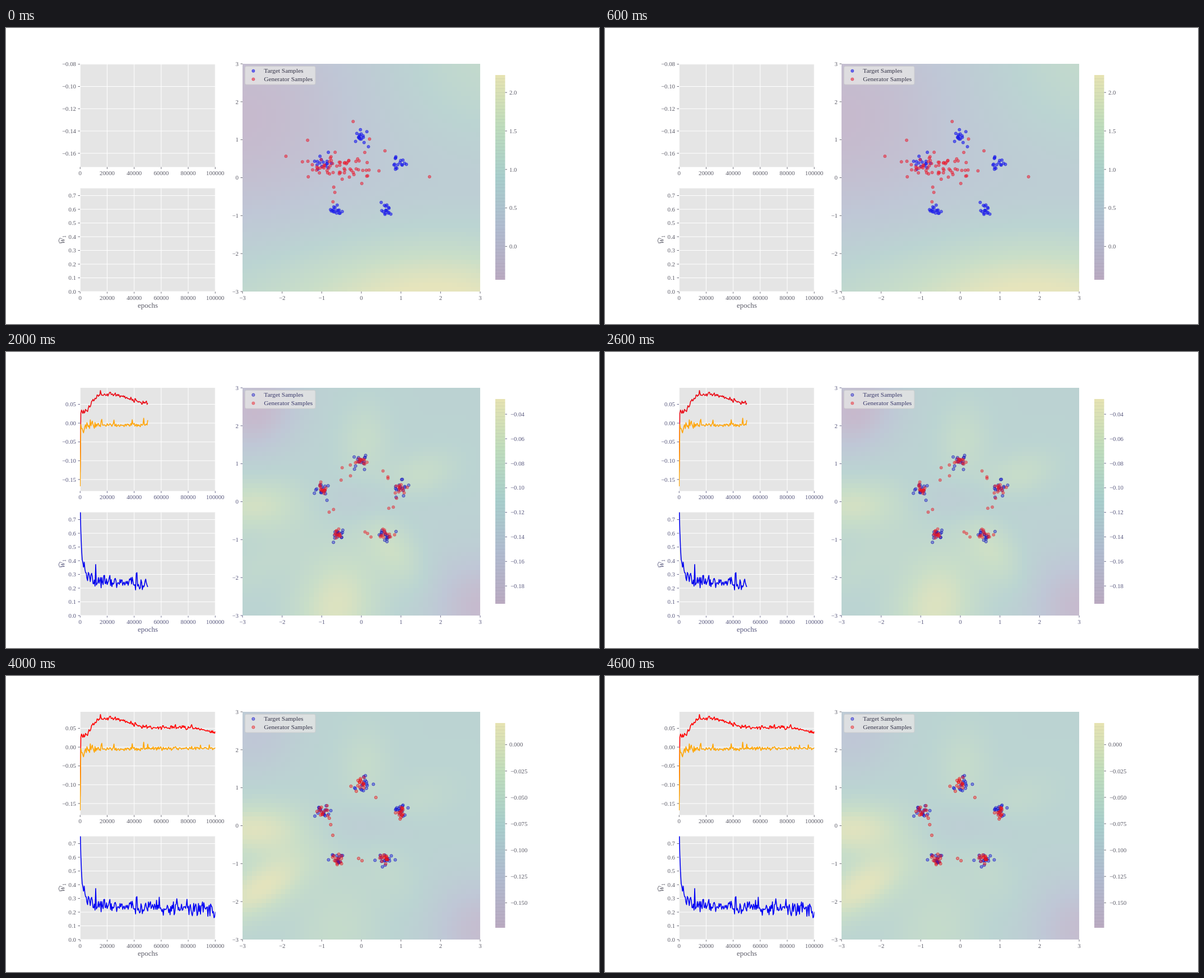
Recreate the animation shown at these times as an HTML page with a canvas. Size 1058 by 529 pixels, loop 5000 ms.

```html
<!DOCTYPE html>
<html lang="en">
<head>
<meta charset="utf-8">
<title>Training progress</title>
<style>
html, body { margin: 0; width: 100%; height: 100%; overflow: hidden; background: #fff; }
section { position: absolute; left: 0; top: 0; width: 1058px; height: 529px; visibility: hidden; animation: show 5s step-end infinite; }
canvas, svg { position: absolute; left: 0; top: 0; }
text { font-family: "Liberation Serif", "Noto Serif", serif; font-size: 10.8px; }
@keyframes show { 0% { visibility: visible; } 20%, 100% { visibility: hidden; } }
</style>
</head>
<body>
<script>
const W = 1058, H = 529, SVG = 'http://www.w3.org/2000/svg';
const PLOT = { x: 422, y: 64, w: 424, h: 407 };
const FIELD_COLORS = ['#c7b8cc', '#bfc7d6', '#bbd4d2', '#c9dec8', '#e6e4bc'];
const BAR_COLORS = ['#baaac1', '#b0bbcf', '#a8cecc', '#bedcbc', '#e6e3b2'];

// The five target clusters form a regular pentagon.
const MODES = Array.from({ length: 5 }, (_, k) => {
  const a = (90 + 72 * k) * Math.PI / 180;
  return [634 + 73 * Math.cos(a), 266 - 74 * Math.sin(a)];
});

// Hills of the critic seen from the origin: direction in degrees, distance, length, width
const HILLS = {
  top: [87, 1.6, .7, .45],
  right: [25, 1.6, .7, .42],
  lowerRight: [-57, 1.5, .8, .42],
  bottom: [257, 2.8, 1.1, .75],
  left: [182, 2.7, 1, .5],
  lowerLeft: [213, 3, 1, .45],
  topCorner: [138, 3.6, .7, .8],
  bottomCorner: [-42, 4.2, 1, .9],
  center: [0, 0, .9, .4]
};

const STEPS = [
  {
    ink: '#5c5c68', legendInk: '#333346', field: untrained,
    bar: { first: 2, delta: -.5, count: 5, digits: 1, y: 115.2, gap: 68.8 },
    target: ['rgba(25,25,240,.6)', 'rgba(25,25,220,.55)'], generator: ['rgba(240,30,50,.55)', 'rgba(215,30,50,.5)'],
    cloud: 72, perMode: 0, strays: 0
  },
  {
    ink: '#58588a', legendInk: '#3c3c78',
    field: trained(.5, { top: .24, right: .28, lowerRight: .28, bottom: .42, left: .25, lowerLeft: -.1, topCorner: -.5, bottomCorner: -.42, center: -.14 }),
    bar: { first: -.05, delta: -.025, count: 8, digits: 3, y: 106, gap: 47.2 },
    target: ['rgba(20,20,170,.36)', 'rgba(10,10,130,.6)'], generator: ['rgba(230,30,40,.42)', 'rgba(185,20,40,.6)'],
    lines: ['#e01430', '#d2a266', '#1414e0'], perMode: 10, strays: 26
  },
  {
    ink: '#58587e', legendInk: '#38386a',
    field: trained(.47, { top: .22, right: .24, lowerRight: .28, bottom: .44, left: .36, lowerLeft: .12, topCorner: -.46, bottomCorner: -.44, center: -.17 }),
    bar: { first: -.04, delta: -.02, count: 8, digits: 2, y: 111.2, gap: 43.85 },
    target: ['rgba(20,20,220,.4)', 'rgba(15,15,160,.6)'], generator: ['rgba(240,20,30,.46)', 'rgba(225,30,40,.4)'],
    lines: ['#ea0814', '#ffa50a', '#0000ee'], perMode: 13, strays: 17
  },
  {
    ink: '#565684', legendInk: '#1c1c48',
    field: trained(.48, { top: .2, right: .24, lowerRight: .2, bottom: .4, left: .36, lowerLeft: .38, topCorner: -.46, bottomCorner: -.42, center: -.21 }),
    bar: { first: -.02, delta: -.02, count: 8, digits: 2, y: 86.5, gap: 46.3 },
    target: ['rgba(20,20,190,.34)', 'rgba(10,10,140,.65)'], generator: ['rgba(250,10,15,.5)', 'rgba(230,20,30,.45)'],
    lines: ['#ff0000', '#ffa500', '#0000f0'], perMode: 12, strays: 18
  },
  {
    ink: '#5c5c68', legendInk: '#333348',
    field: trained(.49, { top: .18, right: .12, lowerRight: .1, bottom: .18, left: .45, lowerLeft: .48, topCorner: -.24, bottomCorner: -.42, center: -.15 }),
    bar: { first: 0, delta: -.025, count: 7, digits: 3, y: 122.7, gap: 47.1 },
    target: ['rgba(20,20,230,.42)', 'rgba(10,10,180,.6)'], generator: ['rgba(255,20,20,.42)', 'rgba(215,15,25,.6)'],
    lines: ['#ff0000', '#ffa500', '#0000f5'], perMode: 14, strays: 8
  }
];

function bell(x, y, sx, sy) {
  return Math.exp(-((x / sx) ** 2 + (y / sy) ** 2) / 2);
}

function untrained(x, y) {
  return .3 - .27 * bell(x + 3, y - 1.6, 1.8, 1.8) + .33 * bell(x - 3.2, y - 3.2, 1.8, 1.8)
    + .75 * bell(x - 2, y + 3.4, 2.6, 1.3) + .2 * bell(x + 3, y + 3.4, 2.2, 1.2);
}

function trained(base, heights) {
  return (x, y) => Object.entries(heights).reduce((sum, [name, height]) => {
    const [degrees, distance, length, width] = HILLS[name], a = degrees * Math.PI / 180;
    const along = x * Math.cos(a) + y * Math.sin(a), across = y * Math.cos(a) - x * Math.sin(a);
    return sum + height * bell(along - distance, across, length, width);
  }, base);
}

function random(seed) {
  return () => {
    seed = seed + 0x6D2B79F5 | 0;
    let t = Math.imul(seed ^ seed >>> 15, 1 | seed);
    t = t + Math.imul(t ^ t >>> 7, 61 | t) ^ t;
    return ((t ^ t >>> 14) >>> 0) / 4294967296;
  };
}

function normal(rnd) {
  return Math.sqrt(-2 * Math.log(1 - rnd())) * Math.cos(2 * Math.PI * rnd());
}

function smooth(from, to, t) {
  const p = Math.max(0, Math.min(1, (t - from) / (to - from)));
  return p * p * (3 - 2 * p);
}

// Loss histories: the trend of y over training progress t, the noise and the height of rare peaks
const CURVES = [
  { start: 215, trend: t => 107 - 31 * smooth(.03, .14, t) + 16 * smooth(.25, .5, t) + 9 * smooth(.83, 1, t),
    noise: t => 3 + 7 * Math.exp(-t / .03), peak: 4, seed: 7 },
  { start: 240, trend: t => 131 - 2 * t + 12 * bell(t - .024, 0, .008, 1),
    noise: t => 3 + 9 * Math.exp(-t / .06), peak: 10, seed: 21 },
  { start: 270, trend: t => 412 + 3 * t - 45 * Math.exp(-t / .05) - 80 * Math.exp(-t / .008) + 14 * smooth(.95, 1, t),
    noise: t => 11, peak: 16, seed: 33 }
];

function history({ start, trend, noise, peak, seed }) {
  const rnd = random(seed);
  return Array.from({ length: 201 }, (_, k) => {
    const t = k / 200, jitter = (rnd() + rnd() - 1) * noise(t) * 1.4;
    const rise = rnd() < .06 ? peak * (.6 + .4 * rnd()) : 0;
    return [132.3 + 241.2 * t, k ? trend(t) + jitter - rise : start];
  });
}

const histories = CURVES.map(history);

function ramp(colors, v) {
  const p = Math.max(0, Math.min(.9999, v)) * (colors.length - 1), i = Math.floor(p);
  const channel = (color, k) => parseInt(color.slice(1 + 2 * k, 3 + 2 * k), 16);
  const mix = k => Math.round(channel(colors[i], k) + (channel(colors[i + 1], k) - channel(colors[i], k)) * (p - i));
  return `rgb(${[0, 1, 2].map(mix)})`;
}

function number(v, digits) {
  return (v < 0 ? '\u2212' : '') + Math.abs(v).toFixed(digits);
}

function drawStep(step, index) {
  const section = document.createElement('section');
  section.style.animationDelay = `${index - 5}s`;
  const canvas = document.createElement('canvas');
  canvas.width = W;
  canvas.height = H;
  const svg = document.createElementNS(SVG, 'svg');
  svg.setAttribute('width', W);
  svg.setAttribute('height', H);
  section.append(canvas, svg);
  const ctx = canvas.getContext('2d');

  function text(value, x, y, anchor, style = '', fill = step.ink) {
    const node = document.createElementNS(SVG, 'text');
    const attrs = { x, y, fill, style, 'text-anchor': anchor };
    for (const key in attrs) node.setAttribute(key, attrs[key]);
    node.textContent = value;
    svg.append(node);
    return node;
  }

  function sideText(value, x, y, style) {
    text(value, 0, 0, 'start', style).setAttribute('transform', `translate(${x} ${y}) rotate(-90)`);
  }

  function line(color, width, ...points) {
    ctx.strokeStyle = color;
    ctx.lineWidth = width;
    ctx.beginPath();
    for (const [x, y] of points) ctx.lineTo(x, y);
    ctx.stroke();
  }

  function tickX(x, y, label) {
    line(step.ink, .9, [x, y], [x, y + 3.5]);
    text(label, x, y + 14.8, 'middle');
  }

  function tickY(x, y, label) {
    line(step.ink, .9, [x - 3.5, y], [x, y]);
    text(label, x - 7, y + 3.7, 'end');
  }

  function panel(top, ticks) {
    ctx.fillStyle = '#e5e5e5';
    ctx.fillRect(132, top, 241.5, 184.5);
    for (let i = 0; i <= 5; i++) {
      const x = 132.3 + i * 48.2;
      line('#fff', 1, [x, top], [x, top + 184.5]);
      tickX(x, top + 184.5, i * 20000);
    }
    for (const [y, label] of ticks) {
      line('#fff', 1, [132, y], [373.5, y]);
      tickY(132, y, label);
    }
  }

  function curve(points, color, top) {
    ctx.save();
    ctx.beginPath();
    ctx.rect(132, top, 241.5, 184.5);
    ctx.clip();
    ctx.lineJoin = 'round';
    line(color, 1.6, ...points.slice(0, index * 50 + 1));
    ctx.restore();
  }

  function dot(x, y, [fill, edge]) {
    ctx.beginPath();
    ctx.arc(x, y, 2.6, 0, 2 * Math.PI);
    ctx.fillStyle = fill;
    ctx.fill();
    ctx.strokeStyle = edge;
    ctx.lineWidth = .9;
    ctx.stroke();
  }

  function field() {
    const n = 50, edge = (start, size, i) => Math.round(start + size * i / n);
    for (let r = 0; r < n; r++) for (let c = 0; c < n; c++) {
      const x = edge(PLOT.x, PLOT.w, c), y = edge(PLOT.y, PLOT.h, r);
      ctx.fillStyle = ramp(FIELD_COLORS, step.field(-3 + 6 * (c + .5) / n, 3 - 6 * (r + .5) / n));
      ctx.fillRect(x, y, edge(PLOT.x, PLOT.w, c + 1) - x, edge(PLOT.y, PLOT.h, r + 1) - y);
    }
    for (let i = -3; i <= 3; i++) {
      tickX(634 + i * 70.67, 471, number(i, 0));
      tickY(422, 267.5 - i * 67.83, number(i, 0));
    }
  }

  function samples() {
    const rnd = random(100 + index);
    const scatter = (count, x, y, spread, style) => {
      while (count--) dot(x + spread * normal(rnd), y + spread * normal(rnd), style);
    };
    for (const [x, y] of MODES) scatter(16, x, y, 7, step.target);
    for (const [x, y] of MODES) scatter(step.perMode, x, y, 5, step.generator);
    // Strays lie along the edges between neighbouring clusters.
    for (let k = 0; k < step.strays; k++) {
      const [x, y] = MODES[k % 5], [nx, ny] = MODES[(k + 1) % 5], p = .1 + .8 * rnd();
      scatter(1, x + (nx - x) * p, y + (ny - y) * p, 6, step.generator);
    }
    for (let k = 0; k < step.cloud; k++) {
      const wide = k % 4 ? 1 : 2, dx = 33 * wide * normal(rnd);
      dot(593 + dx, 246 + dx * .13 + 11 * wide * wide * normal(rnd), step.generator);
    }
  }

  function legend() {
    ctx.beginPath();
    ctx.roundRect(426.5, 68.5, 125.5, 32.5, 2.5);
    ctx.fillStyle = 'rgba(229,229,229,.8)';
    ctx.fill();
    ctx.strokeStyle = 'rgba(204,204,204,.8)';
    ctx.lineWidth = 1;
    ctx.stroke();
    dot(441.3, 76.7, step.target);
    dot(441.3, 91.5, step.generator);
    text('Target Samples', 460.3, 80.3, 'start', 'font-size:11.4px', step.legendInk);
    text('Generator Samples', 460.3, 95.3, 'start', 'font-size:11.4px', step.legendInk);
  }

  function colorbar({ first, delta, count, digits, y, gap }) {
    for (let k = 0; k < 366; k++) {
      ctx.fillStyle = ramp(BAR_COLORS, 1 - k / 365);
      ctx.fillRect(873, 84 + k, 17.5, 1);
    }
    ctx.fillStyle = 'rgba(70,70,100,.07)';
    for (let k = 1; k < 60; k++) ctx.fillRect(873, Math.round(84 + k * 6.1), 17.5, 1);
    for (let k = 0; k < count; k++) {
      const ty = y + k * gap, value = first + k * delta;
      line(step.ink, .9, [890.5, ty], [894, ty]);
      text(number(value, digits), value < 0 ? 900 : 898, ty + 3.7, 'start');
    }
  }

  function axisNames() {
    text('epochs', 253, 500, 'middle', 'font-size:13px');
    sideText('W', 105, 386, 'font-size:12.5px;font-style:italic');
    sideText('1', 107.3, 375, 'font-size:8.5px');
    line(step.ink, .9, [96, 385], [94, 380], [96, 375]);
  }

  const upper = Array.from({ length: 5 }, (_, i) => index
    ? [93.5 + i * 33.6, number(.05 - i * .05, 2)]
    : [64.7 + i * 39.8, number(-.08 - i * .02, 2)]);
  panel(64, upper);
  panel(286.5, Array.from({ length: 8 }, (_, i) => [471 - i * 24.5, number(i / 10, 1)]));
  if (step.lines) histories.forEach((points, i) => curve(points, step.lines[i], i < 2 ? 64 : 286.5));
  field();
  samples();
  legend();
  colorbar(step.bar);
  axisNames();
  return section;
}

document.body.append(...STEPS.map(drawStep));
</script>
</body>
</html>
```
